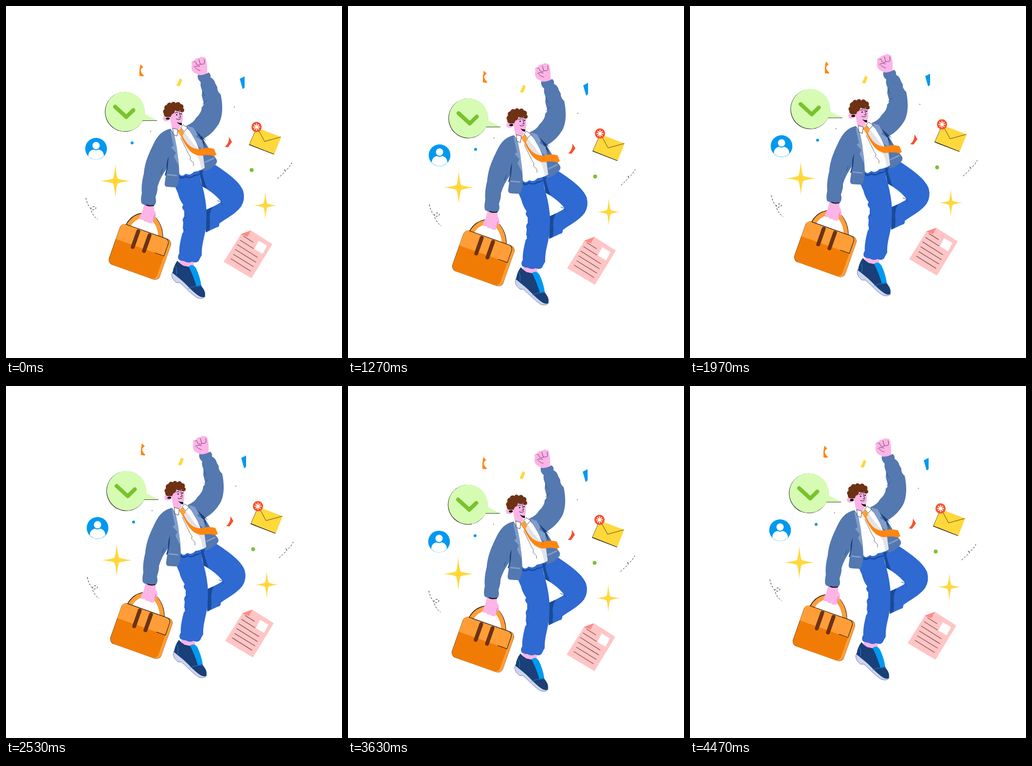
Animation of 690 by 720 pixels, one loop 5.01 s. Source, as an HTML page:

```html
<!DOCTYPE html>
<html lang="en">
<head>
<meta charset="utf-8">
<title>Happy office worker</title>
<style>
  html, body { margin: 0; width: 100%; height: 100%; overflow: hidden; background: #fff; }
  svg { display: block; width: 100vw; height: 100vh; }
  path { stroke-linejoin: round; stroke-linecap: round; }
  .line { fill: none; stroke: #111; stroke-width: 1; }
  .coat { fill: #5478b0; }
  .lapel { fill: #809dcb; }
  .skin { fill: #fdb4e6; }
  .hair { fill: #6d3214; }
  .jeans { fill: #2f69d2; }
  .shade { fill: #194a96; }
  .navy { fill: #1b3f78; }
  .sky { fill: #0099f0; }
  .gold { fill: #ffd83b; }
  .amber { fill: #ff9e38; }
  .orange { fill: #ff8610; }
  .red { fill: #f8512d; }
</style>
</head>
<body>
<svg viewBox="0 0 690 720">
<defs>
  <path id="star" d="M0-34Q2-11 5-5Q12-2 31 0Q12 2 5 5Q2 11 0 34Q-2 11-5 5Q-12 2-31 0Q-12-2-5-5Q-2-11 0-34Z"/>
</defs>
<g id="scene">
  <!-- confetti -->
  <path class="orange" d="M276 119L282 125Q271 131 283 142L282 144L274 143V131Z"/>
  <path class="gold" d="M357 148L362 151L357 164L350 163Z"/>
  <path class="sky" d="M480 149L490 144V167L486 170Z"/>
  <path class="red" d="M458 268L464 278L456 289L449 288Q458 282 458 268Z"/>
  <circle class="sky" cx="259" cy="280" r="3"/>
  <circle cx="504.500" cy="335.500" r="4" fill="#7ac22f"/>
  <path class="line" stroke-dasharray="3 4" d="M164 393Q168 412 178 417Q187 416 184 411Q177 408 174 415Q178 430 188 436M558 353L574 338Q568 331 573 336Q578 336 587 321M469 206v1M297 256v1"/>
  <use href="#star" class="gold" x="224.500" y="358"/>
  <use href="#star" class="gold" transform="translate(532.500 408) scale(.77 .82)"/>

  <!-- speech bubble -->
  <circle cx="243.900" cy="216.500" r="40.700"/>
  <path d="M283 222L311 234.700H278Z"/>
  <g fill="#d6fcb4"><circle cx="244.500" cy="216" r="40.500"/><path d="M283 220L310 234H276Z"/></g>
  <path d="M224 206L247 227L261.500 213" fill="none" stroke="#77c32c" stroke-width="8"/>

  <!-- profile badge -->
  <circle class="sky" cx="185" cy="292" r="22.300"/>
  <path fill="#fff" d="M169 307C169 297 176 293 185 293S201 297 201 307Q194 314 185 314T169 307Z"/>
  <circle class="sky" cx="185" cy="285.500" r="9.500"/>
  <circle fill="#fff" cx="185" cy="285.500" r="7.500"/>

  <!-- envelope -->
  <path d="M514 250L499 284L551 304Z"/>
  <path class="gold" d="M515 249L565 268L551 303L500 283Z"/>
  <path class="line" style="stroke:#5a4614" d="M518 253L531 277L564 268"/>
  <circle class="red" cx="514.500" cy="247.500" r="10.500"/>
  <path d="M514.500 241v13M508 247.500h13M510 243l9 9M519 243l-9 9" fill="none" stroke="#fff" stroke-width="1.800"/>

  <!-- document -->
  <path fill="#ffc5c5" d="M483 466L503 459L547 487L504 557L447 523Z"/>
  <path fill="#ff8a85" d="M482 467L503 459L496 472Z"/>
  <path fill="#fff" d="M519 480L536 490L527 507L510 497Z"/>
  <path class="line" style="stroke:#7c5054;stroke-width:1.300" d="M488 471L507 483M481 479L508 496M475 488L516 514M471 498L513 524M467 508L508 533M462 517L502 542"/>

  <!-- briefcase -->
  <g fill="none">
    <path stroke="#111" stroke-width="9.500" d="M250 449.500C262 427 290 420 306 437.500Q318 453 318 474"/>
    <path stroke="#ff9e38" stroke-width="9" d="M251 450C263 428 290 421 306 438Q317 453 317.500 474"/>
  </g>
  <g transform="translate(237.500 443.500) rotate(19.500)">
    <rect x="-.4" y="-.4" width="111" height="87.800" rx="11"/>
    <rect class="amber" x="2" width="108.500" height="87.300" rx="11"/>
    <rect fill="#f17c05" width="104.500" height="87" rx="10"/>
    <path class="amber" d="M0 35V10Q0 0 10 0H94.500Q104.500 0 104.500 10V35Z"/>
    <path class="line" d="M10 0H94.500Q104.500 0 104.500 10V35H85"/>
    <path d="M38 5V39M62.500 5V39" fill="none" stroke="#6d3214" stroke-width="8"/>
  </g>
  <path class="skin" d="M284 404L280 420L274 432Q274 439 281 437Q284 442 289 441Q294 446 301 444L303 434L308 433Q309 423 304 417L304 406Z"/>
  <path class="line" style="stroke:#b86d9d" d="M303 434L305 428"/>

  <!-- rear leg -->
  <path class="jeans" d="M397 336L430 325C455 342 479 358 487 378Q492 395 483 410C471 426 451 435 438 445Q439 452 432 453Q421 458 411 463L410 417Q426 411 442 401Q430 384 403 369Z"/>
  <path class="shade" d="M396 336L402 338Q405 353 413 374L403 369ZM411 417L424 411Q416 426 419 443L418 458L410 463Z"/>
  <path class="line" style="stroke:#194a96" d="M442 401L434 398M442 401L444 406"/>
  <!-- front leg -->
  <path class="skin" d="M358 515L356 526Q366 535 386 535L385 520Z"/>
  <path class="jeans" d="M346 367L353 383Q356 396 364 407Q359 412 366 419L366 432Q361 435 364 443L363 455Q367 461 362 465C358 480 355 496 356 506Q351 513 355 519Q361 522 366 522Q375 527 382 523Q391 527 396 521Q399 514 402 510C401 490 408 472 410 456Q413 430 411 409Q408 382 400 358L397 335L354 344Z"/>
  <path class="shade" d="M355 345Q360 354 369 347Q378 353 386 345Q397 347 406 333L404 340Q392 349 387 348Q378 355 369 350Q360 357 354 349Z"/>
  <path class="line" style="stroke:#194a96" d="M365 432L370 434M364 460L369 457"/>

  <!-- shoe -->
  <path fill="#cdd4ef" stroke="#46527c" stroke-width=".7" d="M342 544Q338 552 344 560L350 566L357 566C370 577 381 590 393 597Q404 601 409 594Z"/>
  <path class="navy" d="M352 521Q357 527 364 531L378 534L387 539C395 554 397 569 405 578Q411 587 408 595Q402 597 396 593C382 584 369 567 358 559L342 546Q344 531 352 521Z"/>
  <path class="sky" d="M375 533Q383 526 390 536Q398 552 401 571L391 573Q384 550 375 533Z"/>
  <path class="line" style="stroke:#168bd6" d="M348 532Q352 538 350 549M375 578Q387 572 402 573"/>

  <!-- raised fist -->
  <path class="skin" d="M397 144L392 139C382 136 379 128 382 119Q379 114 384 112Q388 112 389 108Q394 106 397 106Q401 102 405 105Q410 104 411 110L413 122L413 139Z"/>
  <path class="line" style="stroke:#713d63" d="M386 114Q390 112 391 119Q397 123 399 119L396 109M399 119Q407 120 408 116L407 109M386 125Q391 121 398 124M389 126Q391 130 399 132"/>

  <!-- jacket -->
  <path class="coat" d="M394 141Q405 143 416 136Q421 139 420 146Q428 150 430 159L434 166Q433 174 441 181C446 205 445 226 437 241Q425 261 405 272L421 299L432 313Q436 320 428 326Q419 336 406 338L370 245Q385 239 390 229Q402 218 402 207Q408 202 405 195L402 183L403 173Q398 163 400 156Q392 149 394 141Z"/>
  <path class="coat" d="M338 251C320 255 311 266 304 280C290 308 285 323 283 343Q277 367 279 383Q275 402 280 405Q290 410 304 408Q310 404 307 391Q312 377 311 370Q317 350 330 333L326 362Q325 370 332 370L349 371Q354 368 356 348L354 285L344 260Z"/>
  <path class="navy" d="M334 308Q329 319 330 332L326 346L328 347L332 332ZM390 256L412 276L404 271L411 291Z"/>
  <path class="line" style="stroke:#274b82" d="M403 173Q405 181 409 184M404 201L412 193M318 343L322 333"/>
  <path class="line" style="stroke-width:2" d="M288 407Q295 410 303 408"/>
  <path fill="none" stroke="#809dcb" stroke-width="3" style="stroke-linecap:butt" d="M331 345L351 347M408 320L427 311"/>

  <!-- shirt -->
  <path fill="#fff" d="M345 259L366 244L382 261Q396 286 408 331Q397 338 386 339Q378 348 369 343Q362 350 357 345Q355 325 354 315L349 284Z"/>
  <path fill="#e2e3e8" d="M366 257L387 285L404 300L408 330L401 334Q397 302 381 300Q367 286 361 266Z"/>
  <path class="lapel" d="M337 254L345 260L351 290L355 328L345 308L349 300L339 289L344 286ZM371 245L385 249L393 263L390 267L403 275L406 295L396 288Z"/>
  <path class="line" style="stroke:#666" d="M359 270L375 303L379 309L378 314L385 321L385 327"/>

  <!-- head -->
  <path class="skin" d="M336 225L341 251Q349 257 357 250L358 244Q364 238 363 226L363 209L340 207Z"/>
  <path d="M351 237Q356 240 361 239L361 244Q355 243 351 237Z"/>
  <ellipse class="skin" cx="329" cy="230" rx="7" ry="6"/>
  <path d="M329 229Q336 226 336.500 231Q332 234 328 231Z"/>
  <g class="hair">
    <circle cx="331" cy="208" r="6"/><circle cx="336" cy="203" r="5.500"/>
    <circle cx="344" cy="201" r="5"/><circle cx="353" cy="202" r="5.500"/>
    <circle cx="359" cy="206" r="5.500"/><circle cx="362" cy="213" r="4"/>
    <circle cx="328" cy="216" r="5.500"/><circle cx="330" cy="221" r="6"/>
    <path d="M328 208L342 200L362 207L357 214Q351 217 347 213Q346 221 341 221L338 227L329 227Z"/>
  </g>
  <path class="line" d="M347 219Q350 216 353 218M355 216Q358 214 361 216M356 218Q357 224 359 227L355 228M350 231Q355 234 359 230"/>
  <circle cx="350.500" cy="222.500" r="1.300"/><circle cx="359.500" cy="220.500" r="1.300"/>

  <!-- collar and tie -->
  <path class="orange" d="M352 256L359 250L366 260L362 265C371 283 380 292 397 293Q413 288 427 292L432 304L427 307Q414 303 403 306C381 308 368 286 359 266Z"/>
  <path class="amber" d="M352 256L359 250L366 260L360 265Z"/>
  <path fill="#fff" stroke="#222" stroke-width=".8" d="M343 250L353 253L351 266L344 263ZM359 248L364 243L373 249L366 257Z"/>
</g>
</svg>
<script>
const LOOP = 5010, HOLD = 4470;
// [time in ms, offset in px]
const driftX = [[0, 0], [530, 3], [3230, 3], [4250, 0], [LOOP, 0]];
const driftY = [[0, 0], [700, 24], [2100, -6], [2230, -6], [3500, 27], [4680, 1]];
const scene = document.getElementById('scene');

function sample(keys, time) {
  const i = keys.findIndex(key => key[0] > time);
  const [t0, a] = keys[i - 1], [t1, b] = keys[i];
  const eased = (1 - Math.cos(Math.PI * (time - t0) / (t1 - t0))) / 2;
  return a + (b - a) * eased;
}

function draw() {
  const time = Math.min(performance.now() % LOOP, HOLD);
  scene.setAttribute('transform', `translate(${sample(driftX, time)} ${sample(driftY, time)})`);
  requestAnimationFrame(draw);
}
draw();
</script>
</body>
</html>
```
